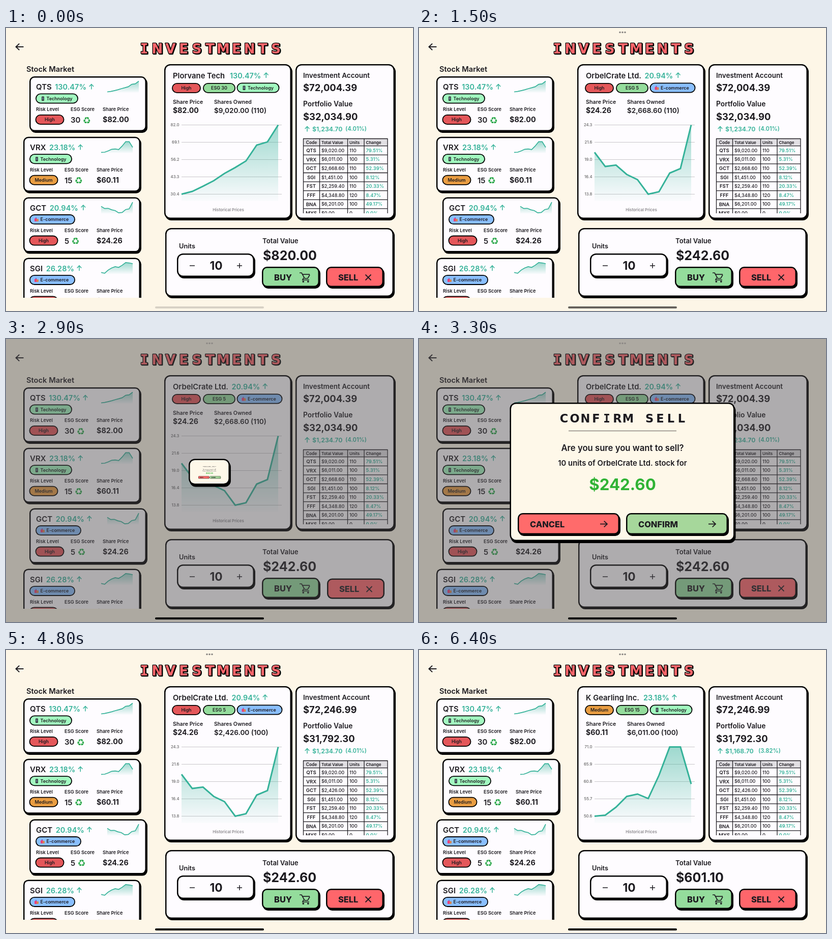
Animation of 800 by 556 pixels, one loop 6500 ms. Source, as an HTML page with a canvas:

```html
<!DOCTYPE html>
<html lang="en">
<head>
<meta charset="utf-8">
<title>Investments</title>
<style>
html, body { margin: 0; width: 100%; height: 100%; overflow: hidden; background: #fdf6e7; }
canvas { display: block; }
</style>
</head>
<body>
<canvas id="stage" width="800" height="556"></canvas>
<script>
const ctx = document.getElementById('stage').getContext('2d');
const LOOP = 6500, INK = '#1d1b20', TEAL = '#35b299', CREAM = '#fdf6e7', WHITE = '#fefcff';
const RED = '#ff666b', GREEN = '#94dc9c';
const SANS = 'Inter, "Open Sans", sans-serif', WIDE = '"DejaVu Sans", sans-serif', MONO = '"DejaVu Sans Mono", monospace';
const RISK = { High: '#e4575a', Medium: '#e99d42' };

const stocks = [
  { code: 'QTS', name: 'Plorvane Tech', pctX: 440, pct: '130.47%', sector: 'Technology', risk: 'High', esg: 30,
    price: 82, low: 30.4, high: 82, curve: [0, .04, .115, .195, .3, .385, .48, .71, .755, 1] },
  { code: 'VRX', name: 'K Gearling Inc.', pctX: 441, pct: '23.18%', sector: 'Technology', risk: 'Medium', esg: 15,
    price: 60.11, low: 50.6, high: 71, curve: [0, .015, .13, .285, .32, .255, .59, 1, 1, .465] },
  { code: 'GCT', name: 'OrbelCrate Ltd.', pctX: 443.5, pct: '20.94%', sector: 'E-commerce', risk: 'High', esg: 5,
    price: 24.26, low: 13.8, high: 24.26, curve: [.605, .4, .42, .285, .21, 0, .035, .305, .37, 1] },
  { code: 'SGI', pct: '26.28%', sector: 'E-commerce', risk: 'High', esg: 10,
    price: 14.51, curve: [.08, 0, .3, .5, .62, .55, .75, 1, .97, .9] }
];
const holdings = [
  ['QTS', 9020, 110, '79.51%'], ['VRX', 6011, 100, '5.31%'], ['GCT', 2668.6, 110, '52.39%'],
  ['SGI', 1451, 100, '8.12%'], ['FST', 2259.4, 110, '20.33%'], ['FFF', 4348.8, 120, '8.47%'],
  ['BNA', 6201, 100, '49.17%'], ['MYS', 0, 0, '0.0%']
];
// [time, stock index] of each tap in the list
const taps = [[-1000, 0], [880, 2], [4820, 1]];
const SOLD = 3795.84;

const ramp = (t, start, length) => Math.min(1, Math.max(0, (t - start) / length));
const smooth = k => k * k * (3 - 2 * k);
const money = v => '$' + v.toLocaleString('en-US', { minimumFractionDigits: 2, maximumFractionDigits: 2 });

// y is the middle of the capitals; returns the right end of the text
function text(str, x, y, size, { weight = 600, color = INK, align = 'left', font = SANS } = {}) {
  ctx.font = `${weight} ${size}px ${font}`;
  ctx.textAlign = align;
  ctx.fillStyle = color;
  ctx.fillText(str, x, y + size * .364);
  return x + ctx.measureText(str).width;
}

function round(x, y, w, h, r, fill) {
  ctx.beginPath();
  ctx.roundRect(x, y, w, h, Math.max(0, r));
  ctx.fillStyle = fill;
  ctx.fill();
}

function box(x, y, w, h, r, fill, shadow = 3) {
  if (shadow) round(x + 2, y + shadow, w, h, r, '#000');
  round(x, y, w, h, r, '#000');
  round(x + 2.5, y + 2.5, w - 5, h - 5, r - 2.5, fill);
}

function line(points, width, color = INK) {
  ctx.beginPath();
  points.forEach(([x, y]) => ctx.lineTo(x, y));
  ctx.lineWidth = width;
  ctx.strokeStyle = color;
  ctx.stroke();
}

// arrow pointing right, turned by a number of quarter turns
function arrow(x, y, size, turns, width, color) {
  ctx.save();
  ctx.translate(x, y);
  ctx.rotate(turns * Math.PI / 2);
  line([[-size, 0], [size, 0]], width, color);
  line([[size * .1, -size * .85], [size, 0], [size * .1, size * .85]], width, color);
  ctx.restore();
}

function pill(label, x, y, w, fill) {
  round(x, y, w, 20, 10, '#000');
  round(x + 1.8, y + 1.8, w - 3.6, 16.4, 8.2, fill);
  text(label, x + w / 2, y + 10, 9, { align: 'center' });
}

function sectorPill(sector, x, y) {
  const tech = sector === 'Technology', w = tech ? 84 : 90;
  pill('', x, y, w, tech ? '#a2f9c0' : '#8abfff');
  text(sector, x + 21.5, y + 10, 9);
  if (tech) {
    round(x + 12, y + 6, 5, 8.5, 1, '#333');
    round(x + 13, y + 7.5, 3, 5, 0, '#5d7787');
  } else {
    round(x + 10, y + 8, 5, 6, 1, '#e8407c');
    round(x + 14, y + 9, 4, 5, 1, '#d98652');
    round(x + 12, y + 6, 2, 2, 1, '#7b4bb5');
  }
}

function graph(curve, x, y, w, h, width, floor) {
  const points = curve.map((v, i) => [x + w * i / (curve.length - 1), y + h * (1 - v)]);
  const fade = ctx.createLinearGradient(0, y, 0, floor);
  fade.addColorStop(0, 'rgba(53,178,153,.48)');
  fade.addColorStop(1, 'rgba(53,178,153,.02)');
  ctx.beginPath();
  points.forEach(p => ctx.lineTo(...p));
  ctx.lineTo(x + w, floor);
  ctx.lineTo(x, floor);
  ctx.fillStyle = fade;
  ctx.fill();
  line(points, width, TEAL);
}

function card(s, x, y) {
  box(x, y, 230, 108, 10, WHITE);
  const pctX = text(s.code, x + 13, y + 21, 15) + 6.5;
  const end = text(s.pct, pctX, y + 21, 14.5, { color: TEAL });
  arrow(end + 10, y + 20.5, 5, -1, 1.5, TEAL);
  graph(s.curve, x + 153, y + 9.5, 62, 21, 1.7, y + 32);
  sectorPill(s.sector, x + 12, y + 33.5);
  text('Risk Level', x + 13, y + 65, 9.3);
  text('ESG Score', x + 81, y + 65, 9.3);
  text('Share Price', x + 144, y + 65, 9.3);
  pill(s.risk, x + 11.5, y + 75, 57, RISK[s.risk]);
  const esgEnd = text(s.esg, x + 81, y + 86, 15);
  text('♻', esgEnd + 4, y + 86, 18, { weight: 400, color: '#2ba84a', font: WIDE });
  text(money(s.price), x + 144, y + 85, 14.4, { weight: 700 });
}

function stockList(shift) {
  text('Stock Market', 40, 80.5, 14.7);
  ctx.save();
  ctx.beginPath();
  ctx.rect(0, 88, 300, 442);
  ctx.clip();
  stocks.forEach((s, i) => card(s, 34 + 12 * shift[i], 95 + 118.8 * i));
  ctx.restore();
}

function detail(s, curve, held) {
  box(311, 71, 250, 304, 12, WHITE);
  text(s.name, 328, 93.5, 14.8);
  const end = text(s.pct, s.pctX, 93.5, 14.4, { color: TEAL });
  arrow(end + 10, 93, 5, -1, 1.5, TEAL);
  pill(s.risk, 326, 108, 57, RISK[s.risk]);
  pill('ESG ' + s.esg, 387, 108, 64, GREEN);
  sectorPill(s.sector, 453.5, 107.5);
  text('Share Price', 328, 145, 10.7);
  text('Shares Owned', 409, 145, 10.5);
  text(money(s.price), 328, 162, 14.2, { weight: 700 });
  text(`${money(held[1])} (${held[2]})`, 409, 162, 13.6);
  for (let i = 0; i < 5; i++) {
    const y = 190.5 + 34 * i;
    line([[345, y], [542, y]], 1, '#c9c7ca');
    text((s.high - (s.high - s.low) * i / 4).toFixed(1), 340.5, y, 7.8, { weight: 500, color: '#666', align: 'right' });
  }
  graph(curve, 345, 190.5, 190, 136, 3, 340);
  text('Historical Prices', 437, 357.5, 7.8, { color: '#8b898d', align: 'center' });
}

function account(rows, sold, gain) {
  box(569, 71, 195, 304, 12, WHITE);
  text('Investment Account', 584, 93, 13.5);
  text(money(72004.39 + 242.6 * sold), 584, 117, 18.4, { weight: 700 });
  text('Portfolio Value', 584, 148.5, 13.8);
  text(money(32034.9 - 242.6 * sold), 584, 174, 18.4, { weight: 700 });
  arrow(592, 198.5, 5, -1, 1.5, TEAL);
  text(money(1234.7 - 66 * gain), 602, 198.5, 12.4, { color: TEAL });
  text(`(${(4.01 - .19 * gain).toFixed(2)}%)`, 667, 198, 11.2, { color: TEAL });

  const columns = [584.5, 616.5, 671.5, 704, 750];
  ctx.save();
  ctx.beginPath();
  ctx.rect(583, 216, 169, 148);
  ctx.clip();
  round(584, 217, 166, 14.5, 0, '#e1dfe3');
  line([[584, 217.5], [750, 217.5]], 1.3);
  columns.forEach(x => line([[x, 217], [x, 366]], 1.3));
  text('Code', 600.5, 225, 8.4, { align: 'center' });
  ['Total Value', 'Units', 'Change'].forEach((h, i) => text(h, columns[i + 1] + 3.5, 225, 8));
  rows.forEach(([code, total, units, change], i) => {
    const y = 240.5 + 17.6 * i;
    line([[584, y - 8.8], [750, y - 8.8]], 1.3);
    text(code, 600, y, 9.6, { align: 'center' });
    text(money(total), 620, y, 9.1, { weight: 500 });
    text(units, 675, y, 9.3, { weight: 500 });
    text(change, 707.5, y, 9.3, { color: TEAL });
  });
  ctx.restore();
}

function button(label, x, y, w, h, fill, pressed, icon) {
  ctx.save();
  if (pressed) ctx.translate(2, 1.5);
  box(x, y, w, h, 10, fill, pressed ? 0 : 3);
  text(label, x + 24, y + h / 2 + 1, 16.4, { weight: 800 });
  icon(y + h / 2 + 1);
  ctx.restore();
}

function cart(y) {
  line([[577, y - 9], [581, y - 9], [587, y + 2], [593, y + 2], [597, y - 5]], 1.7);
  line([[583, y - 6], [597, y - 6]], 1.7);
  line([[585, y + 1], [583, y + 5], [596, y + 5]], 1.7);
  round(582.5, y + 6.5, 3.6, 3.6, 2, INK);
  round(592, y + 6.5, 3.6, 3.6, 2, INK);
}

function cross(y) {
  line([[706.5, y - 5.5], [717.5, y + 5.5]], 1.8);
  line([[717.5, y - 5.5], [706.5, y + 5.5]], 1.8);
}

function order(s, pressed) {
  box(313, 393, 449, 135, 12, WHITE);
  text('Units', 340, 428.5, 12.8);
  box(336, 443, 152, 46, 12, WHITE);
  line([[361, 467], [371, 467]], 1.5);
  line([[454, 467], [464, 467]], 1.5);
  line([[459, 462], [459, 472]], 1.5);
  text('10', 413, 467, 22.8, { weight: 700, align: 'center' });
  text('Total Value', 504, 418.5, 13.2);
  text(money(s.price * 10), 505, 447, 25, { weight: 700 });
  button('BUY', 503, 469, 113, 40, GREEN, false, cart);
  button('SELL', 629, 469, 113, 40, RED, pressed, cross);
}

// wide capitals at an even pitch; x is the middle of the first one, and I takes its slab form
function spaced(str, x, y, size, pitch, paint) {
  ctx.textAlign = 'center';
  [...str].forEach((ch, i) => {
    ctx.font = `700 ${size}px ${ch === 'I' ? MONO : WIDE}`;
    paint(ch, x + pitch * i, y + size * .364);
  });
}

function heading() {
  arrow(27, 37, 7.5, 2, 2);
  ctx.lineJoin = 'round';
  spaced('INVESTMENTS', 271.5, 40.5, 26, 25.9, (ch, x, y) => {
    ctx.lineWidth = 2.6;
    ctx.strokeStyle = '#000';
    ctx.strokeText(ch, x + 1.3, y + 1.3);
    ctx.strokeText(ch, x, y);
    ctx.fillStyle = RED;
    ctx.fillText(ch, x, y);
  });
  ctx.lineJoin = 'miter';
}

// the frame keeps its padding while the content scales
function dialog(scale, filled, pressed) {
  const w = 404 * scale + 38, h = 247 * scale + 25;
  box(399.5 - w / 2, 261 - h / 2, w, h, 12, '#fef8e9', 4);
  if (!filled) return;
  ctx.save();
  ctx.translate(400, 261);
  ctx.scale(scale, scale);
  ctx.translate(-400, -261);
  spaced('CONFIRM SELL', 285, 155.5, 22.5, 21, (ch, x, y) => {
    ctx.fillStyle = INK;
    ctx.fillText(ch, x, y);
  });
  line([[294, 180.5], [506, 180.5]], 1.5, '#8a8680');
  const middle = { align: 'center' };
  text('Are you sure you want to sell?', 400, 214, 16.7, middle);
  text(`10 units of ${stocks[2].name} stock for`, 400, 244, 14.8, middle);
  text('$242.60', 400, 286, 31.3, { weight: 700, color: '#30b335', align: 'center' });
  button('CANCEL', 194, 342, 200, 42, '#ff6b6b', false, y => arrow(363, y - .5, 7, 0, 1.8));
  button('CONFIRM', 407, 342, 200, 42, '#a6d79b', pressed, y => arrow(576, y - .5, 7, 0, 1.8));
  ctx.restore();
}

function system(t) {
  if (t >= 900) [395, 400, 405].forEach(x => round(x - 1.8, 6.7, 3.6, 3.6, 1.8, '#8d8a86'));
  ctx.globalAlpha = t < 100 ? .15 : ramp(t, 900, 1000);
  round(293, 547, 214, 4, 2, '#000');
  ctx.globalAlpha = 1;
}

function draw(t) {
  const now = taps.findLastIndex(([start]) => t >= start);
  const [start, pick] = taps[now];
  const last = now ? taps[now - 1][1] : pick;
  const k = smooth(ramp(t, start, 300));
  const shift = stocks.map((_, i) => (i === pick ? k : 0) + (i === last && last !== pick ? 1 - k : 0));
  const curve = stocks[pick].curve.map((v, i) => stocks[last].curve[i] * (1 - k) + v * k);
  const rows = holdings.map(row => row[0] === 'GCT' && t >= SOLD ? ['GCT', 2426, 100, row[3]] : row);

  ctx.fillStyle = CREAM;
  ctx.fillRect(0, 0, 800, 556);
  heading();
  stockList(shift);
  detail(stocks[pick], curve, rows[pick]);
  account(rows, ramp(t, SOLD, 500), ramp(t, 5950, 450));
  order(stocks[pick], t >= 2780 && t < 2980);

  const dim = ramp(t, 2750, 130) - ramp(t, 3750, 130);
  ctx.fillStyle = `rgba(80,78,80,${.46 * dim})`;
  ctx.fillRect(0, 0, 800, 556);

  const closing = t >= 3800;
  const scale = closing ? (1 - ramp(t, 3800, 200)) ** 1.9 : 1 - (1 - ramp(t, 2890, 300)) ** 3;
  if (scale > .01) dialog(scale, !closing, t >= 3600 && t < 3760);
  system(t);
}

function tick() {
  draw(performance.now() % LOOP);
  requestAnimationFrame(tick);
}
tick();
</script>
</body>
</html>
```
